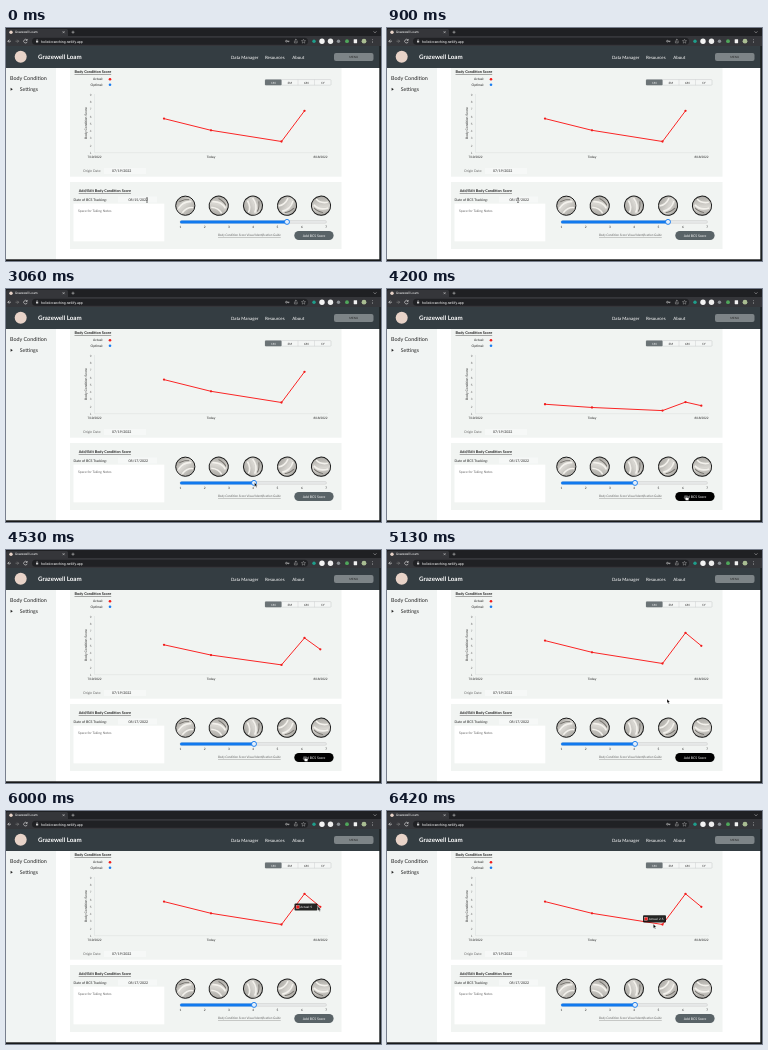
Animation of 375 by 233 pixels, one loop 6450 ms. Source, as an HTML page:

```html
<!DOCTYPE html>
<html lang="en">
<head>
<meta charset="utf-8">
<title>Body condition tracker</title>
<style>
  html, body { margin: 0; width: 100%; height: 100%; overflow: hidden; background: #fff; }
  svg { display: block; width: 375px; height: 233px; text-rendering: geometricPrecision; }
  text { font-family: Lato, "Open Sans", sans-serif; fill: #222; white-space: pre; }
  .sans { font-family: "Liberation Sans", Arial, sans-serif; }
  .ui { font-family: Roboto, "Open Sans", sans-serif; }
  .bold { font-weight: 700; }
  .line { text-decoration: underline; }
  .white { fill: #fff; }
  .grey { fill: #666; }
  .mid { text-anchor: middle; }
  .end { text-anchor: end; }
</style>
</head>
<body>
<svg id="stage" viewBox="0 0 375 233">
  <defs>
    <linearGradient id="hide" x1="0" y1="0" x2="1" y2="1">
      <stop offset="0" stop-color="#8f8d88"/>
      <stop offset=".45" stop-color="#d9d7d2"/>
      <stop offset="1" stop-color="#9b9994"/>
    </linearGradient>
  </defs>
  <rect width="375" height="233" fill="#fff"/>
  <g id="page"></g>
  <g id="chart"></g>
  <g id="browser"></g>
  <g id="overlay"></g>
</svg>
<script>
const LOOP = 6450;
const $ = id => document.getElementById(id);

function add(parent, tag, attrs, content) {
  const el = document.createElementNS('http://www.w3.org/2000/svg', tag);
  for (const k in attrs) el.setAttribute(k, attrs[k]);
  if (content !== undefined) el.textContent = content;
  return parent.appendChild(el);
}
const set = (el, attrs) => { for (const k in attrs) el.setAttribute(k, attrs[k]); };
const box = (g, x, y, width, height, fill, rx = 0, more = {}) =>
  add(g, 'rect', { x, y, width, height, fill, rx, ...more });
const dot = (g, cx, cy, r, fill, more = {}) => add(g, 'circle', { cx, cy, r, fill, ...more });
const path = (g, d, stroke, width = 0.6, fill = 'none') =>
  add(g, 'path', { d, stroke, 'stroke-width': width, fill });
const label = (g, x, y, size, str, cls = '') =>
  add(g, 'text', { x, y, 'font-size': size, class: cls }, str);

// Browser frame
const bar = $('browser');
box(bar, 0, 0, 375, 8.5, '#1f2023');
box(bar, 0, 1, 62, 8, '#35363a', 1.5);
box(bar, 0, 8, 375, 10, '#35363a');
dot(bar, 5, 4.2, 1.7, '#e8d3c8');
label(bar, 9, 5.4, 3.2, 'Grazewell Loam', 'ui white');
path(bar, 'M56.6 3.2l2 2m0-2l-2 2M67 2.7v3m-1.5-1.5h3M367.6 3.4l1.4 1.4l1.4-1.4', '#ddd', 0.5);
path(bar, 'M5 13.2H1.8m1.5-1.5l-1.5 1.5l1.5 1.5', '#e4e4e4');
path(bar, 'M9.5 13.2h3.2m-1.5-1.5l1.5 1.5l-1.5 1.5', '#888');
path(bar, 'M21 12.2a1.8 1.8 0 1 0 .2 1.6M21.2 11v1.4h-1.4', '#e4e4e4');
box(bar, 26, 9.7, 276, 7, '#202124', 3.5);
box(bar, 30, 12.7, 2.2, 1.9, '#ccc', 0.3);
path(bar, 'M30.5 12.8v-.7a.6.6 0 0 1 1.2 0v.7', '#ccc', 0.4);
label(bar, 35, 14.5, 3.5, 'holisticranching.netlify.app', 'ui white');
path(bar, 'M280.5 13.2h3m-1 0v1', '#ccc');
dot(bar, 280.4, 13.2, 0.9, 'none', { stroke: '#ccc', 'stroke-width': 0.5 });
path(bar, 'M288.4 12.6v2.3h2.8v-2.3M289.8 14v-3m-.9.9l.9-.9l.9.9', '#ccc', 0.4);
path(bar, 'M297.5 11.2l.6 1.4l1.5.1l-1.2 1l.4 1.5l-1.3-.8l-1.3.8l.4-1.5l-1.2-1l1.5-.1z', '#ccc', 0.35);
[[308, 1.7, '#1f9d8b'], [316, 2.7, '#f4f4f4'], [324.5, 2.7, '#eee'], [332.5, 1.7, '#8a8f94'],
 [341, 1.9, '#4fa65b']].forEach(([x, r, c]) => dot(bar, x, 13.2, r, c));
box(bar, 347.7, 11.2, 3.4, 4, '#f1f1f1', 0.4);
dot(bar, 358, 13.2, 2.4, '#a9bd92');
[11.7, 13.2, 14.7].forEach(y => dot(bar, 366.5, y, 0.4, '#ddd'));

// Page
const page = $('page');
box(page, 0, 40, 50, 193, '#f1f4f3');
box(page, 0, 18, 375, 22, '#343d42');
dot(page, 14.7, 28.7, 6, '#e8d3c8');
label(page, 32, 31, 6.2, 'Grazewell Loam', 'bold white');
[[225, 'Data Manager'], [259, 'Resources'], [286.3, 'About']]
  .forEach(([x, s]) => label(page, x, 30.6, 4.4, s, 'white'));
box(page, 328, 25, 39.5, 8, '#7d8487', 2);
label(page, 347.7, 30.1, 2.9, 'MENU', 'mid');
label(page, 4, 52, 5.4, 'Body Condition');
label(page, 13.8, 63, 5.2, 'Settings');
path(page, 'M4.6 59.8l2.2 1.5l-2.2 1.5z', 'none', 0, '#222');

const CARD = '#f1f4f2';
box(page, 64, 40, 271.5, 108.7, CARD);
box(page, 64, 154, 271.5, 67, CARD);
label(page, 68.5, 45, 3.8, 'Body Condition Score', 'bold line');
label(page, 97, 52.4, 3.3, 'Actual:', 'end');
label(page, 97, 57.8, 3.3, 'Optimal:', 'end');
dot(page, 104, 51.3, 1.3, '#f01c1c');
dot(page, 104, 56.7, 1.3, '#1b7df0');
box(page, 259, 51.6, 66, 5.6, '#f4f6f5', 0.8, { stroke: '#b9bdbc', 'stroke-width': 0.4 });
box(page, 259, 51.6, 16.6, 5.6, '#6b7376', 0.8);
['1M', '3M', '6M', '1Y'].forEach((s, i) => {
  if (i > 1) path(page, `M${259 + i * 16.5} 51.6v5.6`, '#c4c8c7', 0.4);
  label(page, 267.3 + i * 16.5, 55.6, 3, s, i ? 'mid' : 'mid white');
});
label(page, 77, 144.3, 3.4, 'Origin Date:', 'grey');
box(page, 98, 140, 42, 6, '#f6f8f7');
label(page, 106, 144.4, 3.5, '07/19/2022');

label(page, 72.7, 164.4, 3.75, 'Add/Edit Body Condition Score', 'bold line');
label(page, 67.6, 172.8, 3.5, 'Date of BCS Tracking:');
box(page, 112, 168.6, 39, 5.8, '#f6f8f7');
const dateText = label(page, 122.6, 172.9, 3.5, '');
box(page, 67.5, 175.7, 90.8, 37.6, '#fff');
label(page, 72, 183.6, 3.35, 'Space for Taking Notes', 'grey');

[179.3, 212.7, 247, 281, 315].forEach((x, i) => {
  const g = add(page, 'g', { transform: `translate(${x} 177.7) rotate(${i * 55})` });
  dot(g, 0, 0, 9.6, 'url(#hide)');
  path(g, 'M-7 3Q-2-5 6-4M-3 7Q2 1 8 2', '#f3f1ec', 1.6);
  path(g, 'M-6-4Q0-7 4-6', '#77746f', 1);
  dot(g, 0, 0, 9.6, 'none', { stroke: '#1a1a1a', 'stroke-width': 1 });
});

box(page, 174, 192.5, 146.5, 2.8, '#e6e8e8', 1.4, { stroke: '#bbb', 'stroke-width': 0.35 });
const fill = box(page, 174, 192.4, 107, 3, '#1179ee', 1.5);
const thumb = dot(page, 281, 193.9, 2.5, '#e6effa', { stroke: '#1179ee', 'stroke-width': 0.9 });
for (let i = 0; i < 7; i++) label(page, 174.3 + i * 24.3, 199.5, 3.1, i + 1, 'mid');
label(page, 212, 208.4, 3.15, 'Body Condition Score Visual Identification Guide', 'line grey')
  .setAttribute('font-style', 'italic');
const button = box(page, 288.3, 203, 39.3, 9, '#596367', 4.5);
label(page, 308, 208.7, 3.4, 'Add BCS Score', 'mid white');
box(page, 0, 231.3, 375, 1.7, '#17191a');
box(page, 373.3, 18, 1.7, 215, '#1c2022');

// Chart
const chart = $('chart');
const BASE = 124.7;
const scoreY = s => BASE - (s - 1) * 7.22;
const points = [[158, 5.72], [205, 4.1], [275.5, 2.55], [298.5, 6.8], [314.3, 5]];
path(chart, `M88.5 66V${BASE}H322`, '#d5d9d8', 0.4);
for (let s = 1; s <= 9; s++) label(chart, 85.5, scoreY(s) + 1.1, 3.1, s, 'sans end grey');
[[88.5, '7/19/2022'], [205, 'Today'], [314.5, '8/18/2022']]
  .forEach(([x, s]) => label(chart, x, 130.2, 3.2, s, 'sans mid'));
label(chart, 0, 0, 3.3, 'Body Condition Score', 'sans mid')
  .setAttribute('transform', 'translate(81.3 95) rotate(-90)');
const plot = path(chart, '', '#fb2525', 1);
plot.setAttribute('stroke-linejoin', 'round');
const marks = points.map(([x]) => dot(chart, x, 0, 1.15, '#f01c1c'));

// Overlay
const over = $('overlay');
const status = add(over, 'g', {});
box(status, 0, 226.3, 81, 6.7, '#3c4043', 1);
label(status, 1.5, 230.8, 2.9, 'holisticranching.netlify.app/bcs-module-integration.pdf', 'ui')
  .setAttribute('fill', '#bdc1c6');
status.lastChild.style.fill = '#bdc1c6';

const tip = add(over, 'g', {});
box(tip, 0, -3.6, 23, 7.2, 'rgba(0,0,0,.85)', 1);
const caret = path(tip, 'M23-1.2l1.4 1.2l-1.4 1.2z', 'none', 0, 'rgba(0,0,0,.85)');
box(tip, 1.6, -1.6, 3.2, 3.2, '#f01c1c', 0, { stroke: '#fff', 'stroke-width': 0.3 });
const tipText = label(tip, 5.8, 1.1, 3.1, '', 'sans white');

const pointer = add(over, 'g', {});
const shapes = {
  beam: path(pointer, 'M-.9-2.4Q0-2.4 0-1.8Q0-2.4.9-2.4M0-1.8V1.8M-.9 2.4Q0 2.4 0 1.8Q0 2.4.9 2.4', '#222', 0.5),
  arrow: path(pointer, 'M0 0V4.2L1 3.3L1.7 4.9L2.4 4.6L1.7 3.1H3z', '#fff', 0.35, '#000'),
  hand: path(pointer, 'M0 0Q.6-.5 1 .1V1.9L3.1 2.3Q3.6 2.5 3.5 3.2L3 5H.5L-1.1 2.9Q-1.1 2.2-.5 2.4L0 2.8z', '#111', 0.45, '#fff')
};

// Motion: each stop is [time, ...values]
const clamp = v => Math.min(1, Math.max(0, v));
const smooth = v => v * v * (3 - 2 * v);
function track(stops, t) {
  let i = stops.findIndex(s => s[0] > t);
  if (i < 0) return stops[stops.length - 1].slice(1);
  if (i === 0) return stops[0].slice(1);
  const a = stops[i - 1], b = stops[i];
  const k = smooth((t - a[0]) / (b[0] - a[0]));
  return a.slice(1).map((v, j) => v + (b[j + 1] - v) * k);
}
const latest = (stops, t) => stops.filter(s => s[0] <= t).pop()[1];

const moves = [
  [0, 141, 172], [120, 141, 172], [500, 131, 172], [1430, 131, 172.5], [1710, 267.5, 203],
  [1790, 267.5, 203], [2040, 281, 193], [2180, 281, 193], [2680, 248.5, 193], [3120, 248.5, 193.5],
  [3390, 270, 199], [3700, 298.5, 206.5], [4800, 298.5, 206.5], [5130, 280, 149], [5400, 299, 84],
  [5450, 299, 84], [5580, 306.7, 93], [5720, 312, 95.5], [6080, 312, 95.5], [6400, 266.3, 113]
];
const kinds = [[0, 'beam'], [1500, 'arrow'], [1670, 'hand'], [1840, 'arrow'], [3540, 'hand'], [4900, 'arrow']];
const dates = [[0, '08/15/2022'], [480, '08/01/2022'], [600, '08/17/2022']];
const slides = [[2180, 281], [2680, 248]];
const tips = [[5580, 272.3, 85.6], [5800, 288.5, 96], [6200, 288.5, 96], [6420, 256, 107.8]];
const scores = [[0, '6.8'], [5640, '5'], [6240, '2.5']];
const shades = [[3540, 0], [3640, 1], [5140, 1], [5300, 0]];
const REDRAW = 4123;

function render(t) {
  dateText.textContent = latest(dates, t);

  const [sx] = track(slides, t);
  set(thumb, { cx: sx });
  set(fill, { width: sx - 174 });

  const [dark] = track(shades, t);
  const mix = [89, 99, 103].map(c => Math.round(c * (1 - dark)));
  set(button, { fill: `rgb(${mix})` });

  const redrawn = t >= REDRAW;
  const rise = redrawn ? 1 - (1 - clamp((t - REDRAW) / 1000)) ** 4 : 1;
  const shown = points.slice(0, redrawn ? 5 : 4)
    .map(([x, s]) => [x, BASE + (scoreY(s) - BASE) * rise]);
  set(plot, { d: 'M' + shown.join('L') });
  marks.forEach((m, i) => {
    m.style.display = shown[i] ? '' : 'none';
    if (shown[i]) set(m, { cy: shown[i][1] });
  });

  status.style.display = t >= 1680 && t < 2010 ? '' : 'none';

  const [tx, ty] = track(tips, t);
  set(tip, { transform: `translate(${tx} ${ty})`, opacity: clamp((t - 5390) / 110) });
  tipText.textContent = 'Actual: ' + latest(scores, t);
  caret.style.display = t < 6240 ? '' : 'none';

  const [px, py] = track(moves, t);
  set(pointer, { transform: `translate(${px} ${py})` });
  const kind = latest(kinds, t);
  for (const k in shapes) shapes[k].style.display = k === kind ? '' : 'none';
}

function tick() {
  render(performance.now() % LOOP);
  requestAnimationFrame(tick);
}
tick();
</script>
</body>
</html>
```
